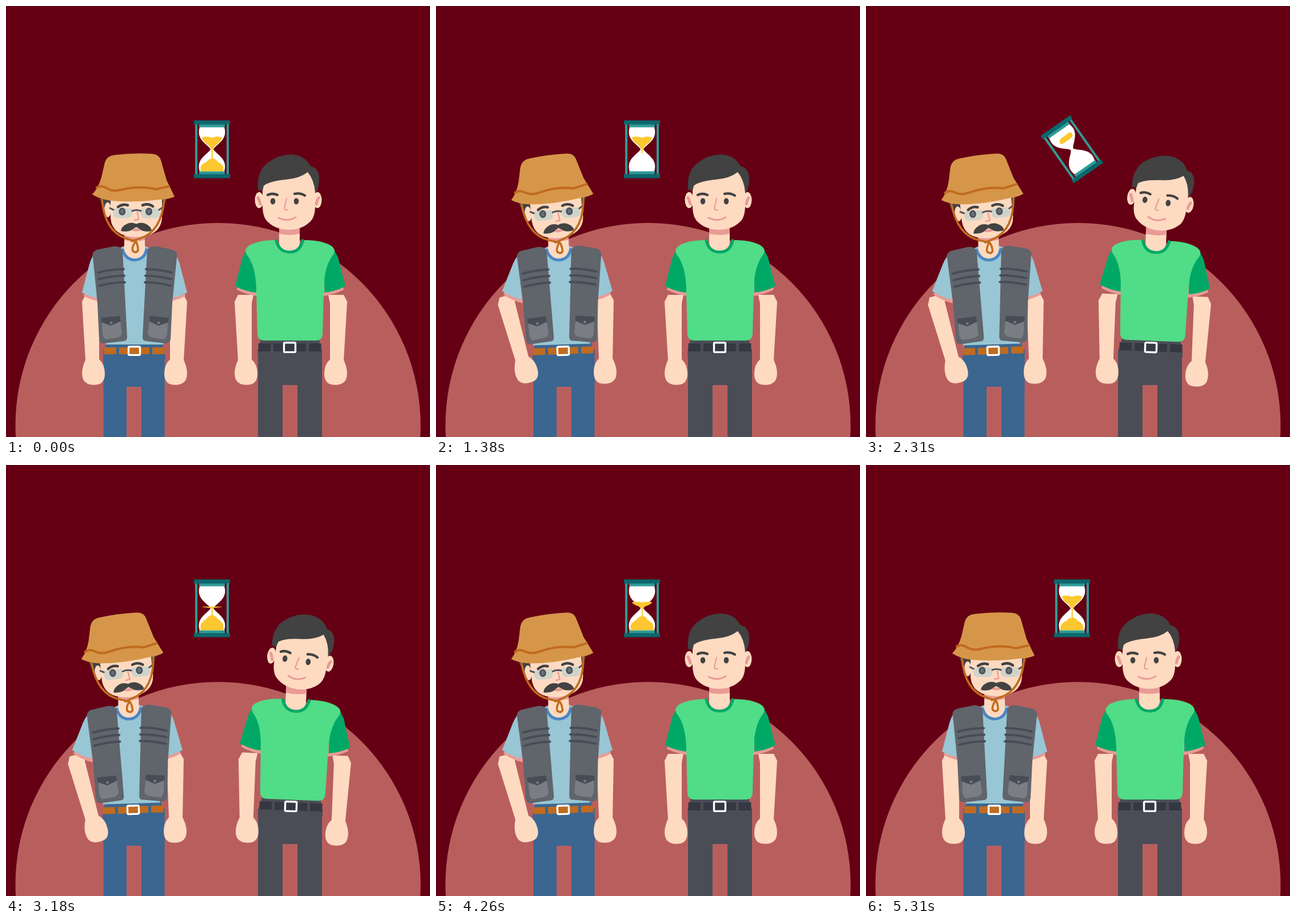
Animation of 742 by 755 pixels, one loop 5340 ms. Source, as an HTML page with a canvas:

```html
<!DOCTYPE html>
<html lang="en">
<head>
<meta charset="utf-8">
<style>
html, body { margin: 0; width: 100%; height: 100%; overflow: hidden; background: #650014; }
canvas { display: block; }
</style>
</head>
<body>
<canvas id="stage" width="742" height="755"></canvas>
<script>
const ctx = document.getElementById('stage').getContext('2d');
const LOOP = 5340, STEP = 30, MOVE = 240, TURN = 1200;
const SKIN = '#fedac1', PINK = '#e99b96', DARK = '#424242';
const DENIM = '#3b6690', TAN = '#c06b1f', SKY = '#98c6d4';
const VEST = '#60646b', SEAM = '#484c56', POCKET = '#7a7e84';
const SLATE = '#4a4d56', NIGHT = '#353842', LIME = '#51dc87', GREEN = '#00a866';
const SAND = '#fdc72f', TEAL = '#0b676d', AQUA = '#2f9b98';

const clamp = x => Math.min(1, Math.max(0, x));
const rad = d => d * Math.PI / 180;

function fill(color, d) {
  ctx.fillStyle = color;
  ctx.fill(new Path2D(d));
}
function line(color, width, d) {
  ctx.strokeStyle = color;
  ctx.lineWidth = width;
  ctx.lineCap = ctx.lineJoin = 'round';
  ctx.stroke(new Path2D(d));
}
function rect(color, x, y, w, h) {
  ctx.fillStyle = color;
  ctx.fillRect(x, y, w, h);
}
function oval(color, x, y, rx, ry) {
  ctx.fillStyle = color;
  ctx.beginPath();
  ctx.ellipse(x, y, rx, ry, 0, 0, Math.PI * 2);
  ctx.fill();
}
function scoped(draw) {
  ctx.save();
  draw();
  ctx.restore();
}
function flip(cx, draw) {
  scoped(() => {
    ctx.translate(2 * cx, 0);
    ctx.scale(-1, 1);
    draw();
  });
}
function both(cx, draw) {
  draw();
  flip(cx, draw);
}
function stretch(y, k, draw) {
  scoped(() => {
    ctx.translate(0, y * (1 - k));
    ctx.scale(1, k);
    draw();
  });
}
// Turns and shifts a limb around its pivot by the share p.
function part(p, x, y, dx, dy, deg, draw) {
  scoped(() => {
    ctx.translate(x + dx * p, y + dy * p);
    ctx.rotate(rad(deg * p));
    ctx.translate(-x, -y);
    draw();
  });
}

// Lean there and back, with a small dip on the way.
function lean(t, go, back) {
  const a = clamp((t - go) / MOVE), b = clamp((t - back) / MOVE);
  const ease = k => (1 - Math.cos(Math.PI * k)) / 2;
  const dip = Math.sin(Math.PI * a) + Math.sin(Math.PI * b);
  return { p: ease(a) - ease(b), squash: 1 - 0.016 * dip };
}
function eyeOpen(t) {
  const beat = (t + 2070) % 2400 - 0;
  return Math.max(0.14, clamp(Math.min(beat, 2400 - beat) / 105));
}

// ---- parts both men share ----
function legs(color, cx, half, crotch) {
  rect(color, cx - half, 602, 2 * half, crotch - 602);
  both(cx, () => rect(color, cx - half, 602, half - 13, 153));
}
function belt(pants, color, cx, half, y, h) {
  fill(pants, `M${cx - half + 5} ${y - 7}h${2 * half - 10}l5 20v10h${-2 * half}v-10Z`);
  rect(color, cx - half + 1, y, 2 * half - 2, h);
  both(cx, () => rect(pants, cx - half + 22.5, y, 5, h));
  ctx.strokeStyle = '#fff';
  ctx.lineWidth = 3.4;
  ctx.beginPath();
  ctx.roundRect(cx - 10, y - 1.2, 20, h + 2.6, 2);
  ctx.stroke();
}
function forearm(x) {
  scoped(() => {
    ctx.translate(x, 642);
    fill(SKIN, 'M-14 -136H13L10 -121V-23Q20 -14 20 2 20 18 8 21 -10 24 -17 14 -24 0 -14 -22L-20 -124Z');
  });
}
function sleeve(color, d) {
  scoped(() => {
    ctx.translate(3, 6);
    fill(PINK, d);
  });
  fill(color, d);
}
function neck(cx, y) {
  fill(SKIN, `M${cx - 18} ${y - 4}h36v30q-4 16 -18 16 -14 0 -18 -16Z`);
  fill(PINK, `M${cx - 18} ${y - 4}h36v13q-18 4 -36 0Z`);
}

// ---- man with the hat ----
function hatHead(open) {
  both(222.5, () => {
    fill(DARK, 'M163 336H188L176 371Z');
    oval(SKIN, 178, 357, 6, 13);
  });
  both(228, () => fill(SKIN, 'M229 334H183V372Q186 404 229 405Z'));
  line(DARK, 4.6, 'M196 352Q204 346 213 349M239 349Q249 345 257 351');
  line(PINK, 2.3, 'M230 361L232 374 225 375');
  oval(PINK, 228, 392, 8, 2.5);
  both(228, () => fill(DARK, 'M228.5 382Q218 377 209 383 202 387 201 394 216 397 223 390L228.5 387Z'));
  for (const x of [188, 236]) {
    ctx.beginPath();
    ctx.roundRect(x, 354.5, 33, 17, [3, 3, 8, 8]);
    ctx.fillStyle = '#cfd4cb';
    ctx.fill();
    oval('#647177', x + 20 - x / 40, 360, 4.5, 5.3 * open);
    ctx.strokeStyle = '#50515b';
    ctx.lineWidth = 3;
    ctx.stroke();
  }
  line('#50515b', 3, 'M188 357L182 354M221 359Q228 356 236 359M268 357L274 353');
  both(222.5, () => line(TAN, 3.6, 'M168 339Q173 395 210 407L225 412'));
  line(TAN, 3.6, 'M227 412Q219 424 222 429 228 434 231 428 231 418 227 412');
  fill('#d6964a', 'M173 274Q177 262 190 261 222 257 256 259 268 260 271 270L281 305 295 334Q284 339 269 339 226 345 184 341 165 339 151 330 162 318 167 300Z');
  line(TAN, 4, 'M159 318Q166 313 176 319 187 326 201 322 234 314 262 321 275 318 285 316');
}
function vestSide() {
  fill(VEST, 'M188 421Q202 420 204 429L212 580Q212 587 206 587L171 591Q164 591 163 583L160 520 152 440Q149 431 159 427Z');
  for (let i = 0; i < 3; i++) line(SEAM, 4, `M${161 + i} ${467 + 11.5 * i}q23 -6 45 -6`);
  fill(POCKET, 'M168 553L200 550 203 574Q200 580 194 581L174 584Q170 580 169 575Z');
  fill(SEAM, 'M166 546L199 543 201 552 184 560 167 554Z');
  oval(POCKET, 184, 555, 2.3, 2.3);
}
function vestTorso() {
  both(225, () => fill(SKY, 'M226 420H208L190 428 175 593H226Z'));
  neck(225, 401);
  line('#4a86c5', 5, 'M204 427Q209 444 225 445 242 444 246 427');
  both(225.5, vestSide);
}
function hatMan(t) {
  const { p, squash } = lean(t, 1020, 4480), open = eyeOpen(t);
  const arm = () => forearm(153);
  const cuff = () => sleeve(SKY, 'M158 429Q150 438 146 452L133 502Q148 510 168 513V430Z');
  legs(DENIM, 224, 53.5, 667);
  stretch(660, squash, () => {
    part(p, 224, 604, -2, 0, -1.8, () => belt(DENIM, TAN, 224.5, 54, 598, 12));
    part(p, 153, 643, 5, -3, -14, arm);
    part(p, 297, 643, -1, -2, -2.3, () => flip(225, arm));
    part(p, 147, 508, -18, -1, 7, cuff);
    part(p, 225, 505, -8, 0, -1.7, () => {
      flip(225, cuff);
      vestTorso();
    });
    part(p, 223, 332, -19.5, 2.5, -6, () => hatHead(open));
  });
}

// ---- man in the green shirt ----
function bareHead(open) {
  both(494, () => {
    oval(SKIN, 443, 340, 7.5, 14);
    line(PINK, 5, 'M441 336Q444 341 445 347');
  });
  both(495, () => fill(SKIN, 'M496 284H449V350Q449 371 459 379 473 392 496 392Z'));
  fill(DARK, 'M441 322Q438 289 459 274 478 260 499 260 524 262 532 280 547 284 548 300 549 315 543 326H541Q539 304 528 291 514 302 490 304 460 307 451 315L449 324Z');
  line(DARK, 4.3, 'M458 331Q466 327 475 331M505 329Q515 327 523 332');
  for (const x of [467, 508]) oval(DARK, x, 342, 4.3, 5.6 * open);
  line(PINK, 2.1, 'M491 337L487 355Q488 358 493 357');
  line(PINK, 3, 'M477 371Q492 379 507 370');
}
function shirtTorso() {
  both(497.5, () => sleeve(GREEN, 'M421 427L414 440 401 491Q418 500 438 502V440Z'));
  neck(496, 390);
  both(497, () => fill(LIME, 'M498 431Q477 431 472 410 441 410 425 420 416 426 421 435 438 456 438 500L440 575Q441 586 452 586H498Z'));
  line(GREEN, 5, 'M473 411Q478 431 496 431 515 431 519 411');
}
function shirtMan(t) {
  const { p, squash } = lean(t, 2075, 3310), open = eyeOpen(t);
  const arm = () => forearm(420);
  legs(SLATE, 497, 56, 664);
  stretch(660, squash, () => {
    part(p, 497, 598, 2, 0, 2, () => belt(SLATE, NIGHT, 496.5, 56, 591, 14));
    part(p, 420, 640, 2, -2, 2.3, arm);
    part(p, 576, 640, 2, 3, 2.3, () => flip(498.5, arm));
    part(p, 497, 505, 7.5, 0.5, 2.3, shirtTorso);
    part(p, 487.5, 342, 21, 0, 8, () => bareHead(open));
  });
}

// ---- hourglass; u counts ms from the middle of its turn ----
function hourglass(t) {
  const phase = t < 60 ? 690 : (t + 180) % TURN;
  const u = phase < TURN - 135 ? phase : phase - TURN;
  const turning = u < 180;
  const bulb = 'M-21 40C-30 16 -5 8 -2 -1H2C5 8 30 16 21 40Z';
  scoped(() => {
    ctx.translate(360.5, 251);
    if (turning) ctx.rotate(rad(90 + 27.5 * Math.floor(u / 45)));
    for (const s of [-1, 1]) scoped(() => {
      ctx.scale(s, s);
      fill('#fff', bulb);
      rect(AQUA, 25.5, -44, 4, 88);
      rect(AQUA, -22.5, 38.5, 45, 5.5);
      rect(TEAL, -31.5, 43.4, 63, 7.2);
    });
    if (turning) {
      stretch(21, u < 45 ? 1 : 0.72, () =>
        fill(SAND, 'M-12 29.5Q-17 28 -16 23 -16 15 -5 15.5H7Q12 16 10.5 21 11 27 5 28.5Z'));
    } else {
      const drain = clamp((u - 690) / 310);
      const tail = Math.min(38, 7 + Math.max(0, u - 360) * 0.36);
      stretch(0, 1 - drain, () =>
        fill(SAND, 'M-17.5 -21Q-9 -24 0 -20 8 -24 17.5 -21 17 -14 6 -7L1 0H-1L-6 -7Q-17 -14 -17.5 -21Z'));
      if (u > 300 && drain < 1) rect(SAND, -0.7, -3, 2, tail + 3);
      stretch(38.5, clamp((u - 440) / 250) + 0.22 * drain, () =>
        fill(SAND, 'M-20 38.5V31Q-17 25 -10 22 -5 16 1 16 7 17 10 22 18 26 20 31V38.5Z'));
    }
  });
}

function draw(now) {
  const t = Math.floor(now % LOOP / STEP) * STEP;
  rect('#650014', 0, 0, 742, 755);
  oval('#b85f5e', 371, 734.5, 354.5, 354.5);
  hourglass(t);
  hatMan(t);
  shirtMan(t);
}
const start = performance.now();
function frame() {
  draw(performance.now() - start);
  requestAnimationFrame(frame);
}
frame();
</script>
</body>
</html>
```
